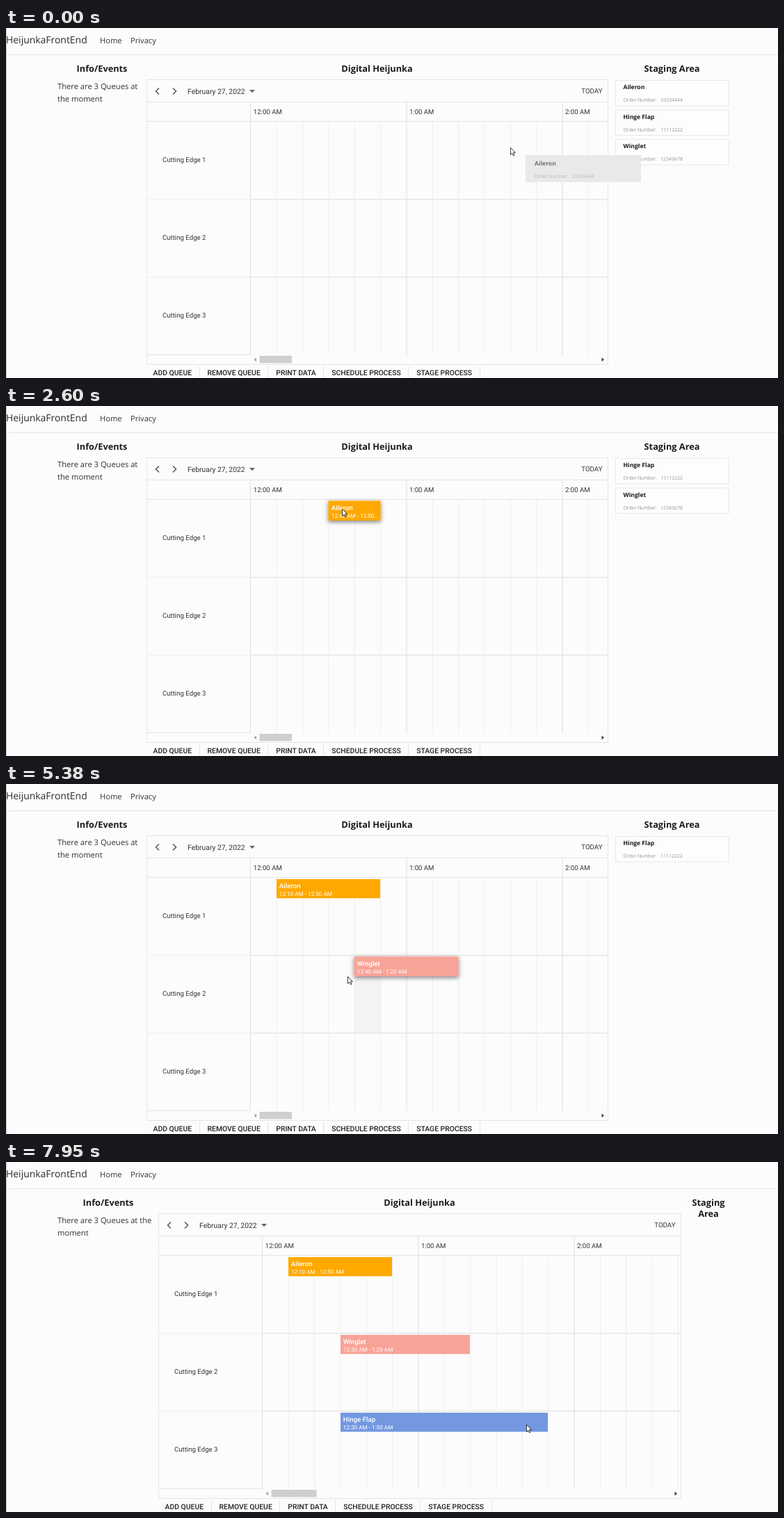
Recreate the animation shown at these times as an HTML page. Size 1110 px wide and 504 px high, loop 8000 ms.

```html
<!DOCTYPE html>
<html lang="en">
<head>
<meta charset="utf-8">
<title>Digital Heijunka</title>
<style>
  html, body { margin: 0; width: 100%; height: 100%; overflow: hidden; background: #fcfcfc; }
  svg { display: block; text-rendering: geometricPrecision; }
  .ui { font-family: "Open Sans", "Noto Sans", sans-serif; }
  .cal { font-family: Roboto, sans-serif; }
</style>
</head>
<body>
<svg id="stage" width="1110" height="504" viewBox="0 0 1110 504"></svg>
<script>
const LOOP = 8000;
const GRID = 351.9, CELL = 37.35, TOP = 135, ROW = 112, SHIFT = 17;
const LAG = { ghost: 15, cell: 30, text: 50 };  // the page trails the pointer by these times

// each item is dragged from staging to a row, then stretched by one edge
const ITEMS = [
  { name: 'Aileron', num: '33334444', fill: '#ffa900', row: 0, grab: 0, drop: 760, size: [2530, 2780] },
  { name: 'Hinge Flap', num: '11112222', fill: '#7398e0', row: 2, grab: 6100, drop: 6470, size: [7640, 7920], right: true },
  { name: 'Winglet', num: '12345678', fill: '#f8a398', row: 1, grab: 3405, drop: 3890, size: [5200, 5440] }
];
const WIDE_AT = 6470;  // staging is empty, so the calendar widens

// pointer moves: start, end, x, y
const HOME = [725, 172];
const MOVES = [
  [130, 600, 518, 191], [1160, 1540, 488, 150], [1820, 2270, 505, 148], [2530, 2780, 392, 149],
  [2830, 3300, 884, 140], [3330, 3870, 632, 313], [3880, 4090, 610, 296], [4100, 4540, 610, 262],
  [4880, 5010, 616, 266], [5200, 5440, 469, 279], [5560, 6000, 936, 102], [6030, 6430, 484, 427],
  [6470, 6880, 520, 382], [7120, 7350, 512, 382], [7640, 7920, 748, 378]
];

const smooth = k => k * k * (3 - 2 * k);
function pointer(t) {
  let [x, y] = HOME;
  for (const [from, to, px, py] of MOVES) {
    if (t <= from) break;
    const k = smooth(Math.min(1, (t - from) / (to - from)));
    x += (px - x) * k;
    y += (py - y) * k;
  }
  return [x, y];
}
const shiftAt = t => t >= WIDE_AT ? SHIFT : 0;
const cellX = (i, shift) => Math.round(GRID + CELL * i) + shift;
const rowY = r => TOP + ROW * r;
const cellAt = t => Math.floor((pointer(t)[0] - GRID - shiftAt(t)) / CELL);

// first and last cell edge of an event at time t
function span(item, t) {
  let a = cellAt(item.drop - 1), b = a + 1;
  const [from, to] = item.size;
  if (t > from) {
    const c = cellAt(Math.min(t, to));
    if (item.right) b = Math.max(b, c + 1);
    else a = Math.min(a, c);
  }
  return [a, b];
}
function clock(cell) {
  const hour = Math.floor(cell / 6) || 12;
  return `${hour}:${cell % 6}0 AM`;
}

// drawing helpers
const stage = document.getElementById('stage');
function set(el, attrs) {
  for (const k in attrs) el.setAttribute(k, attrs[k]);
}
function add(parent, tag, attrs, content) {
  const el = document.createElementNS('http://www.w3.org/2000/svg', tag);
  set(el, attrs);
  if (content !== undefined) el.textContent = content;
  parent.appendChild(el);
  return el;
}
const group = p => add(p, 'g', {});
const box = (p, x, y, width, height, fill, more) =>
  add(p, 'rect', { x, y, width, height, fill, ...more });
const path = (p, d, fill, more) => add(p, 'path', { d, fill, ...more });
const label = (p, cls, x, y, size, fill, str, more) =>
  add(p, 'text', { class: cls, x, y, 'font-size': size, fill, ...more }, str);
const hLine = (p, x1, x2, y, c) => box(p, x1, y, x2 - x1, 1, c);
const vLine = (p, x, y1, y2, c) => box(p, x, y1, 1, y2 - y1, c);
const show = (el, on) => el.setAttribute('visibility', on ? 'visible' : 'hidden');
const move = (el, x, y) => el.setAttribute('transform', `translate(${x} ${y})`);

const lift = add(add(stage, 'defs', {}), 'filter',
  { id: 'lift', x: '-30%', y: '-60%', width: '160%', height: '240%' });
add(lift, 'feDropShadow', { dx: 0, dy: 2, stdDeviation: 3, 'flood-color': '#000', 'flood-opacity': .5 });

box(stage, 0, 0, 1110, 504, '#fcfcfc');
hLine(stage, 0, 1110, 38, '#e6e6e6');
vLine(stage, 0, 0, 504, '#c8c8c8');
label(stage, 'ui', 0, 22.3, 13.95, '#2b2b2b', 'HeijunkaFrontEnd');
label(stage, 'ui', 135, 21.5, 11.15, '#333', 'Home');
label(stage, 'ui', 179, 21.5, 11.15, '#333', 'Privacy');
const hover = box(stage, 0, 0, CELL, ROW, '#f3f3f3');

function buildLayout(wide) {
  const g = group(stage);
  const dx = wide ? SHIFT : 0, left = 202 + dx, right = wide ? 970 : 865, body = 351 + dx;
  const heading = (x, y, s) => label(g, 'ui', x, y, 12.75, '#1a1a1a', s,
    { 'text-anchor': 'middle', 'font-weight': 700 });

  heading(wide ? 147 : 138, 63.2, 'Info/Events');
  heading((left + right) / 2, 63.2, 'Digital Heijunka');
  (wide ? ['Staging', 'Area'] : ['Staging Area']).forEach((s, i) =>
    heading(wide ? 1010 : 957.5, 63.2 + 16.2 * i, s));
  (wide ? ['There are 3 Queues at the', 'moment'] : ['There are 3 Queues at', 'the moment'])
    .forEach((s, i) => label(g, 'ui', 74, 88 + 18 * i, 11.2, '#333', s));

  for (const y of [74, 106, 134, 484]) hLine(g, left, right + 1, y, '#e4e4e4');
  for (const x of [left, right]) vLine(g, x, 74, 484, '#e6e6e6');
  vLine(g, body, 107, 471, '#e0e0e0');
  hLine(g, left, body, 470, '#e4e4e4');
  for (let r = 0; r < 3; r++) {
    label(g, 'cal', 225 + dx, rowY(r) + 58.4, 9.65, '#333', 'Cutting Edge ' + (r + 1));
    if (!r) continue;
    hLine(g, left, body, rowY(r) - .7, '#eee');
    hLine(g, body, right, rowY(r) - .7, '#dcdcdc');
  }
  for (let i = 0, x; (x = GRID - .5 + CELL * i + dx) < right; i++) {
    const hour = i % 6 === 0;
    if (i) vLine(g, x, hour ? 107 : TOP, 471, hour ? '#dcdcdc' : '#eee');
    if (hour) label(g, 'cal', x + 4.4, 124.3, 9.65, '#333', clock(i));
  }

  for (const s of [-1, 1])
    path(g, `M${230 + 10 * s + dx} 86.5l${4.5 * s} 4.5l${-4.5 * s} 4.5`.replace(/M\d+/, `M${(s < 0 ? 220 : 240) + dx}`),
      'none', { stroke: '#555', 'stroke-width': 1.5 });
  label(g, 'cal', 261 + dx, 94.8, 10.4, '#333', 'February 27, 2022');
  path(g, `M${350 + dx} 89h8l-4 4.2z`, '#666');
  label(g, 'cal', right - 7.5, 94.4, 9.7, '#333', 'TODAY', { 'text-anchor': 'end' });

  path(g, `M${360 + dx} 474.5v6l-3.5 -3z`, '#a5a5a5');
  path(g, `M${right - 8.5} 474.5v6l3.5 -3z`, '#444');
  box(g, 364.5 + dx, 472, wide ? 65 : 46.5, 10.5, '#cfcfcf');

  let x = 211.5 + dx;
  for (const s of ['ADD QUEUE', 'REMOVE QUEUE', 'PRINT DATA', 'SCHEDULE PROCESS', 'STAGE PROCESS']) {
    const t = label(g, 'cal', x, 499.8, 10.4, '#222', s, { 'font-weight': 500 });
    x += t.getComputedTextLength() + 22.5;
    vLine(g, Math.round(x - 12), 487, 504, '#e4e4e4');
  }
  return g;
}
const layouts = [buildLayout(false), buildLayout(true)];

function buildCard(item, ghost) {
  const g = group(stage);
  const x = ghost ? 13 : 11.5, y = ghost ? 14.5 : 13;
  const small = { 'font-weight': 300 }, grey = ghost ? '#999' : '#5c5c5c';
  if (ghost) box(g, 0, 0, 166, 39, '#e9e9e9');
  else box(g, .5, .5, 163, 36.5, '#fdfdfd', { stroke: '#e8e8e8' });
  label(g, 'ui', x, y, 8.55, ghost ? '#707070' : '#1a1a1a', item.name, { 'font-weight': 700 });
  label(g, 'ui', x, y + 18, 7, grey, 'Order Number:', small);
  label(g, 'ui', x + 53.5, y + 18, 7, grey, item.num, small);
  return g;
}
function buildEvent(item) {
  const g = group(stage);
  return {
    g,
    rect: box(g, 0, 0, 0, 0, item.fill),
    title: label(g, 'cal', 3.8, 12.6, 9.7, '#fff', '', { 'font-weight': 500 }),
    time: label(g, 'cal', 3.8, 24, 8.2, '#fff', '')
  };
}
for (const it of ITEMS) it.card = buildCard(it, false);
for (const it of ITEMS) it.event = buildEvent(it);
for (const it of ITEMS) it.ghost = buildCard(it, true);

const arrow = path(stage, 'M.5 .3V10.4L2.8 8.3L4.4 11.8L6 11.1L4.5 7.6L7.4 7.4Z', '#fff',
  { stroke: '#222', 'stroke-width': .9 });
const sizer = path(stage, 'M-7 0L-3.6 -3.5V-1.1H3.6V-3.5L7 0L3.6 3.5V1.1H-3.6V3.5Z', '#fff',
  { stroke: '#111', 'stroke-width': 1 });

// shorten a label with dots until it fits
function fit(el, str, width) {
  el.textContent = str;
  for (let n = str.length - 1; n > 0 && el.getComputedTextLength() > width; n--)
    el.textContent = str.slice(0, n) + '...';
}

// returns the event's pixel box, or null before it is dropped
function drawEvent(item, t) {
  const { g, rect, title, time } = item.event;
  show(g, t >= item.drop);
  if (t < item.drop) return null;
  const shift = shiftAt(t);
  const [a, b] = span(item, t - LAG.cell), [ta, tb] = span(item, t - LAG.text);
  const x = cellX(a, shift), w = cellX(b, shift) - x - 1, y = rowY(item.row) + 2;
  const lifted = t >= item.size[0] && t < item.size[1] + 20;
  const grow = lifted ? .5 : 0;
  move(g, x, y);
  set(rect, {
    x: -grow, y: -grow, width: w + 2 * grow, height: 27.5 + 2 * grow,
    filter: lifted ? 'url(#lift)' : 'none'
  });
  const text = `${clock(ta)} - ${clock(tb)}`, key = text + w;
  if (key !== item.key) {
    fit(title, item.name, w - 5.5);
    fit(time, text, w - 5.5);
    item.key = key;
  }
  return { x, y, w, h: 27.5 };
}

function draw(t) {
  const shift = shiftAt(t), [px, py] = pointer(t), [gx, gy] = pointer(t - LAG.ghost);
  layouts.forEach((g, i) => show(g, !!shift === !!i));

  let slot = 0, over = null;
  for (const it of ITEMS) {
    const staged = t < it.drop;
    show(it.card, staged);
    if (staged) move(it.card, 876, 75 + 42.5 * slot++);
    show(it.ghost, staged && t >= it.grab);
    move(it.ghost, Math.round(gx) + 22, Math.round(gy) + 11);
    const e = drawEvent(it, t);
    if (e && px >= e.x && px <= e.x + e.w && py >= e.y && py <= e.y + e.h) over = e;
  }

  const cell = cellAt(t - LAG.cell), row = Math.floor((pointer(t - LAG.cell)[1] - TOP) / ROW);
  show(hover, t >= ITEMS[0].drop && !over && cell >= 0 && px < 865 && row >= 0);
  set(hover, { x: cellX(cell, shift), y: rowY(row) });

  const sizing = over && Math.min(px - over.x, over.x + over.w - px) < 18;
  show(arrow, !sizing);
  show(sizer, sizing);
  move(sizing ? sizer : arrow, Math.round(px), Math.round(py));
}

const start = performance.now();
function tick() {
  draw((performance.now() - start) % LOOP);
  requestAnimationFrame(tick);
}
tick();
</script>
</body>
</html>
```
